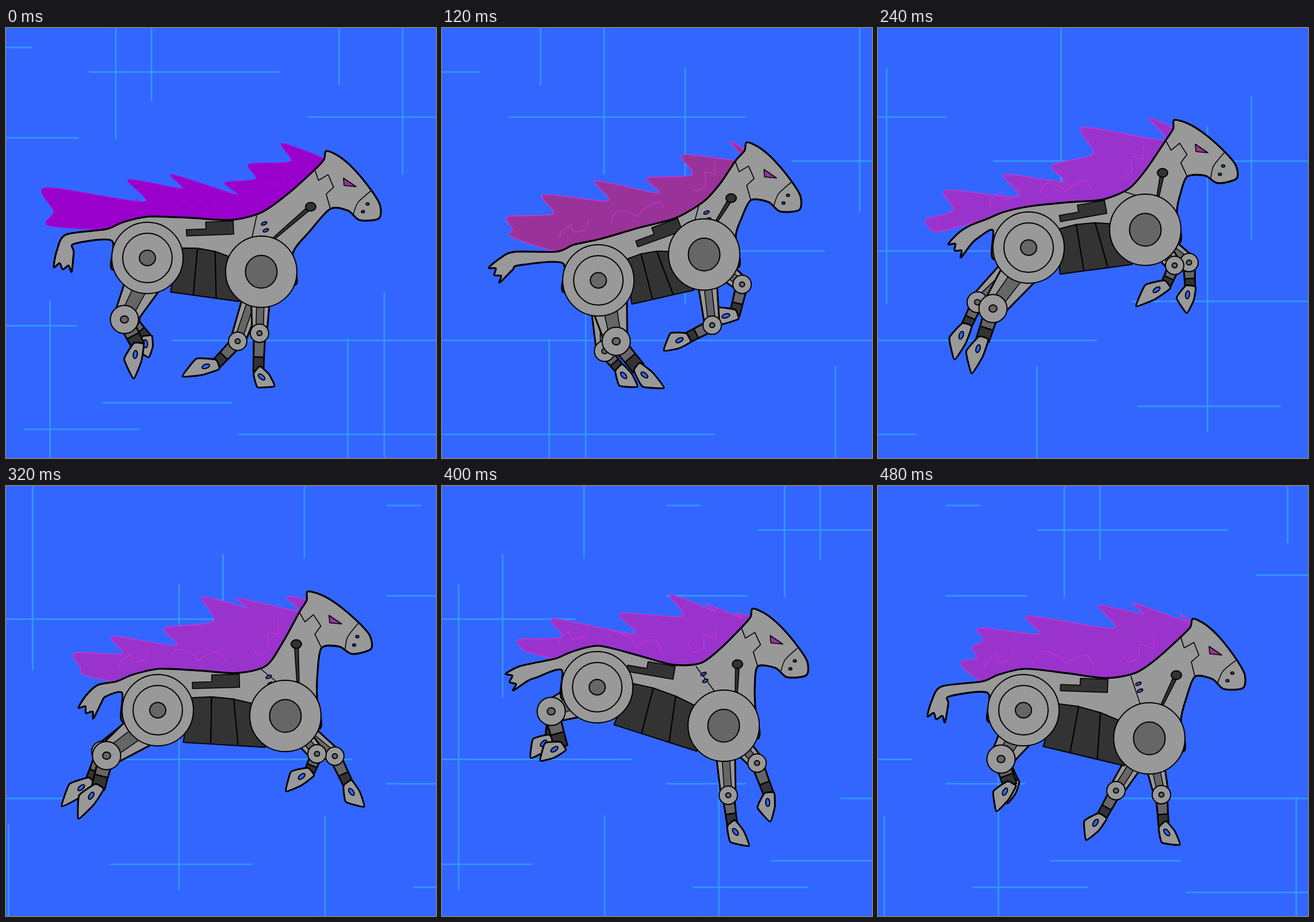
Recreate the animation shown at these times as an HTML page with a canvas. Size 748 by 748 pixels, loop 0.52 s.

```html
<!DOCTYPE html>
<html lang="en">
<head>
<meta charset="utf-8">
<title>Galloping machine horse</title>
<style>
html, body { margin: 0; width: 100%; height: 100%; overflow: hidden; background: #36f; }
canvas { display: block; width: 100vw; height: 100vh; }
</style>
</head>
<body>
<canvas id="stage" width="748" height="748"></canvas>
<script>
const ctx = document.getElementById('stage').getContext('2d');
const STEP_MS = 40, STEPS = 13, SCROLL = 136, WORLD = 1765;
const SKY = '#3366ff', METAL = '#999999', MID = '#666666', DARK = '#333333', INK = '#000000';

// Grid: [y, from x, to x] and [x, from y, to y]
const ROWS = [[34, -15, 45], [76.5, 144, 476], [155, 524, 936], [191, -15, 126], [231.5, 1016, 1593],
  [388, 800, 1074], [475.5, 1257, 1691], [518, -15, 124], [543.5, 288, 1197], [652, 167, 393],
  [658, 1268, 1517], [698, 31, 232], [707, 403, 883]];
const COLS = [[191, 0, 194], [253, 0, 128], [579.5, 0, 100], [690, 0, 255], [76.5, 474, 748],
  [594.5, 540, 748], [658, 459, 748], [831, 70, 480], [1134.5, 0, 321], [1092.5, 588, 748],
  [1389, 171, 703], [1465.5, 118, 368], [1607, 0, 126], [1643, 573, 748]];

// Head outline, ear to throat, and cheek seam, both measured from the eye
const HEAD = [[-33, -45], [-10, -37], [18, -16], [50, 18], [67, 43], [66, 66], [33, 71], [12, 56], [-19, 55]];
const CHEEK = [[-50, -9], [-43, 7], [-27, -4], [-16, 17], [-28, 30], [-19, 55]];

// Joints of the key poses. tail: bend, end.  legs: knee, fetlock, toe for
// far rear, near rear, and the two front legs.  flames: mane tips from head to tail.
const POSES = [
  { step: 0, rear: [246, 400], fore: [444, 424], eye: [587, 261], tilt: 4, withers: [444, 321],
    tail: [112, 368, 100, 415],
    flames: [480, 201, 423, 237, 381, 269, 289, 255, 213, 264, 69, 278, 73, 343],
    legs: [[215, 505, 245, 540, 248, 573], [206, 507, 230, 553, 222, 610],
      [403, 545, 364, 586, 307, 606], [441, 531, 439, 598, 467, 623]] },
  { step: 3, rear: [272, 439], fore: [456, 394], eye: [560, 246], tilt: 4, withers: [455, 302],
    tail: [130, 402, 95, 427],
    flames: [501, 198, 419, 221, 357, 261, 268, 266, 177, 290, 115, 328, 121, 363],
    legs: [[283, 562, 310, 594, 340, 624], [303, 545, 342, 592, 386, 626],
      [522, 446, 509, 499, 456, 516], [470, 517, 425, 540, 386, 561]] },
  { step: 5, rear: [242, 423], fore: [456, 370], eye: [538, 225], tilt: 0, withers: [432, 282],
    tail: [135, 395, 98, 417],
    flames: [439, 185, 387, 207, 337, 238, 261, 268, 144, 284, 63, 323, 92, 353],
    legs: [[170, 529, 162, 585, 180, 624], [198, 531, 193, 587, 222, 624],
      [535, 422, 529, 462, 519, 499], [520, 400, 500, 446, 453, 478]] },
  { step: 6, rear: [262, 382], fore: [465, 351], eye: [552, 202], tilt: -5, withers: [437, 279],
    tail: [168, 355, 137, 384],
    flames: [471, 157, 356, 173, 303, 238, 220, 255, 118, 282, 84, 333, 106, 354],
    legs: [[173, 477, 153, 520, 133, 577], [200, 488, 182, 543, 163, 601],
      [541, 408, 543, 453, 537, 496], [516, 413, 500, 448, 449, 484]] },
  { step: 8, rear: [264, 390], fore: [486, 400], eye: [562, 225], tilt: -6, withers: [452, 313],
    tail: [167, 357, 142, 391],
    flames: [488, 193, 404, 195, 342, 193, 276, 247, 186, 262, 120, 290, 135, 328],
    legs: [[167, 462, 146, 516, 97, 557], [175, 469, 160, 526, 126, 579],
      [572, 470, 596, 520, 623, 558], [541, 466, 527, 499, 487, 531]] },
  { step: 10, rear: [270, 350], fore: [490, 417], eye: [571, 260], tilt: 3, withers: [450, 308],
    tail: [160, 322, 122, 339],
    flames: [510, 221, 460, 205, 397, 189, 310, 222, 194, 231, 134, 267, 158, 291],
    legs: [[194, 394, 188, 441, 154, 473], [190, 392, 207, 454, 171, 478],
      [498, 538, 505, 590, 534, 626], [548, 482, 569, 538, 571, 584]] },
  { step: 12, rear: [253, 390], fore: [472, 439], eye: [576, 279], tilt: 6, withers: [448, 325],
    tail: [118, 358, 103, 401],
    flames: [525, 222, 446, 204, 384, 208, 261, 226, 177, 247, 164, 280, 143, 308],
    legs: [[219, 480, 236, 515, 225, 552], [214, 475, 230, 521, 206, 566],
      [414, 530, 388, 577, 362, 616], [493, 537, 497, 592, 525, 624]] }
];

function mix(a, b, u) {
  if (typeof a === 'number') return a + (b - a) * u;
  if (Array.isArray(a)) return a.map((v, i) => mix(v, b[i], u));
  return Object.fromEntries(Object.keys(a).map(k => [k, mix(a[k], b[k], u)]));
}

function poseAt(step) {
  const i = POSES.findLastIndex(p => p.step <= step);
  const a = POSES[i], b = POSES[(i + 1) % POSES.length];
  return mix(a, b, (step - a.step) / ((b.step || STEPS) - a.step));
}

const points = flat => flat.flatMap((v, i) => i % 2 ? [] : [[v, flat[i + 1]]]);
const add = (p, v, s = 1) => [p[0] + v[0] * s, p[1] + v[1] * s];
const angle = (a, b) => Math.atan2(b[1] - a[1], b[0] - a[0]);
const distance = (a, b) => Math.hypot(b[0] - a[0], b[1] - a[1]);
const heading = (a, b) => [Math.cos(angle(a, b)), Math.sin(angle(a, b))];
const side = ([x, y]) => [-y, x];

// Points given in a frame turned by the angle around an origin
const placed = (origin, turn, list) => list.map(([x, y]) => [
  origin[0] + x * Math.cos(turn) - y * Math.sin(turn),
  origin[1] + x * Math.sin(turn) + y * Math.cos(turn)]);

function paint(fill, stroke, width) {
  if (fill) { ctx.fillStyle = fill; ctx.fill(); }
  if (stroke) { ctx.strokeStyle = stroke; ctx.lineWidth = width; ctx.stroke(); }
}

function poly(pts, fill, width = 2, closed = true) {
  ctx.beginPath();
  pts.forEach(p => ctx.lineTo(...p));
  if (closed) ctx.closePath();
  paint(fill, INK, width);
}

// Cardinal spline through the points
function curve(pts, fill, { stroke = INK, width = 2, closed = true, bend = 0.14 } = {}) {
  const n = pts.length;
  const at = i => closed ? pts[(i + n) % n] : pts[Math.max(0, Math.min(n - 1, i))];
  ctx.beginPath();
  ctx.moveTo(...pts[0]);
  for (let i = 0; i < (closed ? n : n - 1); i++) {
    const [a, b, c, d] = [at(i - 1), at(i), at(i + 1), at(i + 2)];
    ctx.bezierCurveTo(b[0] + (c[0] - a[0]) * bend, b[1] + (c[1] - a[1]) * bend,
      c[0] - (d[0] - b[0]) * bend, c[1] - (d[1] - b[1]) * bend, ...c);
  }
  paint(fill, stroke, width);
}

function oval([x, y], rx, ry, fill, width = 2, turn = 0) {
  ctx.beginPath();
  ctx.ellipse(x, y, rx, ry, turn, 0, Math.PI * 2);
  paint(fill, INK, width);
}

function strip(a, b, wa, wb, fill, width) {
  const n = side(heading(a, b));
  poly([add(a, n, wa), add(b, n, wb), add(b, n, -wb), add(a, n, -wa)], fill, width);
}

function drawGrid(step) {
  ctx.fillStyle = SKY;
  ctx.fillRect(0, 0, 748, 748);
  ctx.fillStyle = '#3399ff';
  for (const shift of [0, WORLD]) {
    const dx = shift - step * SCROLL;
    for (const [y, x1, x2] of ROWS) ctx.fillRect(x1 + dx, y - 1.3, x2 - x1, 2.6);
    for (const [x, y1, y2] of COLS) ctx.fillRect(x + dx - 1.3, y1, 2.6, y2 - y1);
  }
}

function drawLeg(flat, hip, { radius, thigh, shin }) {
  const [knee, fetlock, toe] = points(flat);
  strip(hip, knee, thigh, radius * 0.8, METAL, 3);
  strip(hip, knee, thigh * 0.35, radius * 0.4, MID, 1.5);
  strip(knee, fetlock, shin, shin * 0.85, MID, 3);
  strip(mix(knee, fetlock, 0.62), fetlock, shin * 0.9, shin * 0.9, DARK, 2.5);
  oval(knee, radius, radius, METAL);
  oval(knee, radius * 0.28, radius * 0.26, MID);

  const along = heading(fetlock, toe), across = side(along);
  const heel = add(mix(fetlock, toe, 0.45), across, 21);
  const ankle = add(fetlock, along, -4);
  curve([add(ankle, across, 8), add(ankle, across, -9), add(mix(fetlock, toe, 0.45), across, -9), toe, heel],
    METAL, { width: 3, bend: 0.07 });
  oval(add(mix(fetlock, toe, 0.27), across, 3), 7, 3.5, SKY, 2, angle(fetlock, toe));
}

function tailOutline({ tail, rear }) {
  const [bend, end] = points(tail);
  const along = heading(bend, end), out = side(along);
  const bendOut = mix(side(heading(add(rear, [-67, -38]), bend)), out, 0.5);
  const tuft = [-2, -1, 0, 1, 2].map(j => add(add(end, out, j * 8), along, j % 2 ? -4 : 5));
  return [add(bend, bendOut, -12), add(mix(bend, end, 0.4), out, -11), ...tuft,
    add(mix(bend, end, 0.5), out, 18), add(bend, bendOut, 14)];
}

// Top line from the root of the tail to the ear
function backLine({ rear, withers }, nape, earBase) {
  const hip = add(rear, [3, -72]);
  return [add(rear, [-72, -50]), add(rear, [-43, -62]), hip,
    add(mix(hip, withers, 0.38), [0, 5]), add(mix(hip, withers, 0.73), [0, 11]),
    withers, add(mix(withers, nape, 0.45), [2, 3]), nape, earBase];
}

function drawMane(flames, edge, step) {
  const stroke = step ? '#cc33cc' : '#b000cc';
  const tips = points(flames);
  const outline = tips.flatMap((tip, i) => {
    const next = tips[i + 1];
    if (!next) return [tip];
    const gap = Math.min(distance(tip, next), 120);
    return [tip, add(tip, [gap * 0.22, gap * 0.28 + (next[1] - tip[1]) * 0.35])];
  });
  const fill = `rgb(153, ${step ? 51 : 0}, ${step > 0 && step < 6 ? 153 : 204})`;
  curve([...outline, ...edge], fill, { stroke, width: 1.6 });

  for (const start of [0.3, 2.3, 4.6]) {
    const strand = Array.from({ length: 9 }, (_, j) => {
      const u = start + j * 0.2, i = Math.floor(u);
      return add(mix(edge[i], edge[i + 1], u - i), [-8 + 6 * Math.cos(j * 2), -27 + 9 * Math.sin(j * 1.4 + start)]);
    });
    curve(strand, null, { stroke, width: 1.3, closed: false });
  }
}

function drawBelly(rear, fore) {
  const turn = angle(rear, fore);
  const [t0, b0] = placed(rear, turn, [[54, -24], [47, 54]]);
  const [t1, b1] = placed(fore, turn, [[-52, -18], [-32, 56]]);
  const top = u => add(mix(t0, t1, u), [0, -24 * u * (1 - u)]);
  for (let i = 0; i < 3; i++) {
    const u = i / 3, v = (i + 1) / 3;
    poly([top(u), top(v), mix(b0, b1, v), mix(b0, b1, u)], DARK);
  }
}

function drawShoulder({ fore, eye, withers }, hip) {
  const corner = add(mix(hip, withers, 0.75), [0, 13]);
  poly(placed(corner, angle(hip, withers),
    [[-48, 0], [0, 0], [0, 23], [-82, 23], [-82, 12], [-48, 12]]), DARK, 1.6);
  poly([add(withers, [-8, 6]), add(fore, [-16, -60])], null, 1.5, false);
  for (const slot of [[5, 19], [8, 31]]) oval(add(withers, slot), 5, 2.3, SKY, 2, -0.4);
  const knob = add(eye, [-57, 50]);
  strip(knob, add(fore, [22, -58]), 3.5, 2, DARK, 1.5);
  oval(knob, 9, 7.5, DARK);
}

function drawFace(eye, tilt) {
  const local = list => placed(eye, tilt, list);
  poly(local(CHEEK), null, 1.6, false);
  poly([eye, add(eye, [22, 15]), add(eye, [1, 13])], '#993399', 1.6);
  curve(local([[49, 19], [28, 41], [21, 64]]), null, { width: 1.5, closed: false });
  local([[45, 42], [38, 56]]).forEach(p => oval(p, 2.6, 2, SKY));
}

function drawHorse(pose, step) {
  const { rear, fore, eye, legs } = pose;
  const tilt = pose.tilt * Math.PI / 180;
  const head = placed(eye, tilt, HEAD);
  const edge = backLine(pose, ...placed(eye, tilt, [[-50, -12], [-36, -30]]));
  const throat = head.at(-1), chest = add(fore, [55, -32]);

  const haunch = add(rear, [12, 5]);
  drawLeg(legs[0], haunch, { radius: 18, thigh: 30, shin: 10 });
  drawLeg(legs[1], haunch, { radius: 24.5, thigh: 38, shin: 13 });
  for (const leg of legs.slice(2)) drawLeg(leg, fore, { radius: 16, thigh: 19, shin: 10 });

  drawMane(pose.flames, edge, step);
  curve([...head, add(mix(throat, chest, 0.5), [-3, 0]), chest, add(fore, [60, 22]), fore, rear,
    add(rear, [-61, 20]), add(rear, [-62, -30]), ...tailOutline(pose), ...edge], METAL, { width: 3.2 });
  drawBelly(rear, fore);
  drawShoulder(pose, edge[2]);
  drawFace(eye, tilt);

  for (const r of [62, 43]) oval(rear, r, r, METAL);
  oval(rear, 14, 13.5, MID);
  oval(fore, 62, 62, METAL);
  oval(fore, 27.5, 28.5, MID);
}

function frame() {
  const step = Math.floor(performance.now() / STEP_MS) % STEPS;
  drawGrid(step);
  drawHorse(poseAt(step), step);
  requestAnimationFrame(frame);
}

ctx.lineJoin = ctx.lineCap = 'round';
frame();
</script>
</body>
</html>
```
